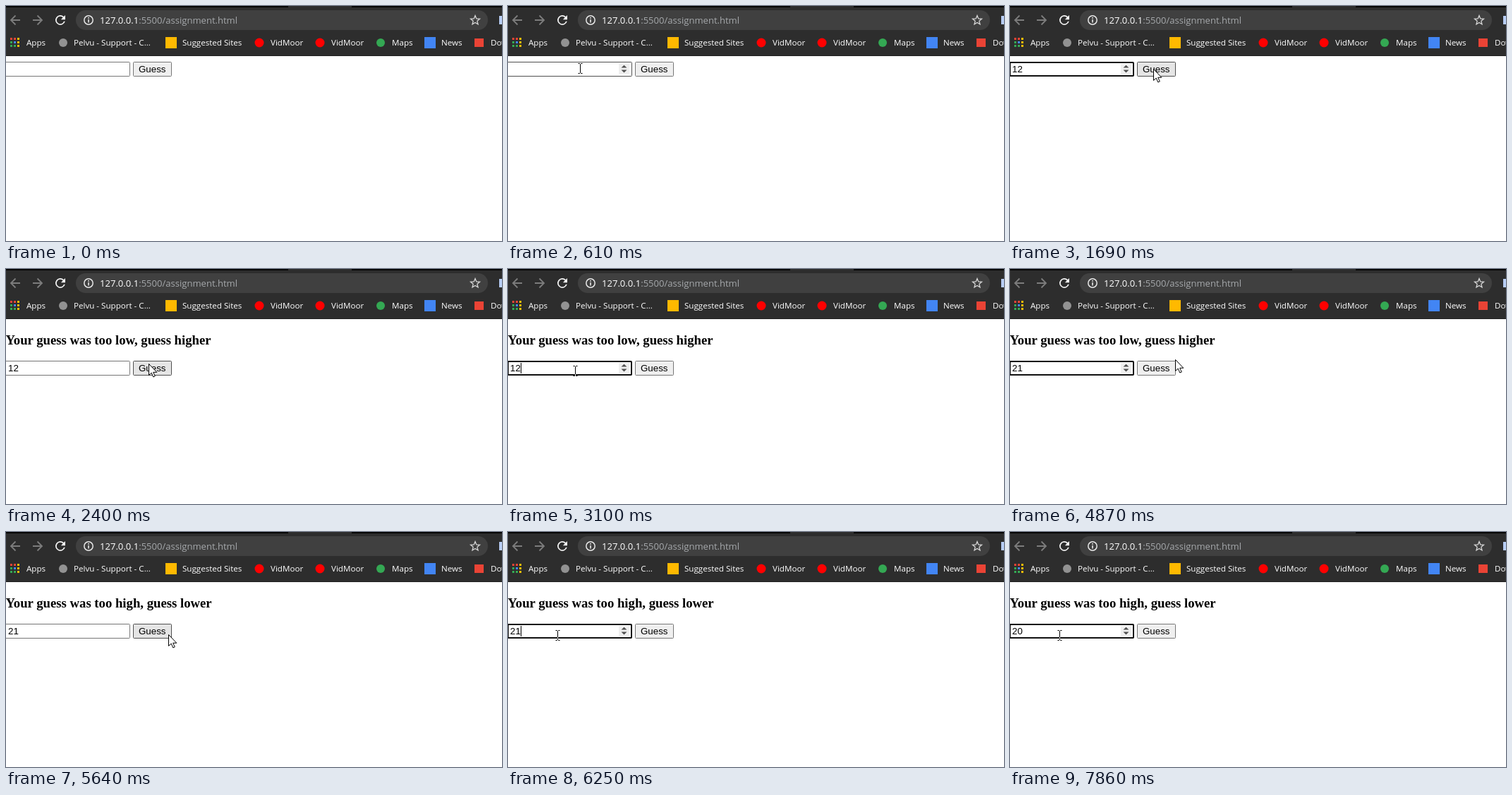
Write an HTML page that moves like this. It is 703 px wide and 333 px high and loops after 8 s.

```html
<!DOCTYPE html>
<html lang="en">
<head>
<meta charset="utf-8">
<title>Number guessing page</title>
<style>
  html, body { margin: 0; width: 100%; height: 100%; overflow: hidden; background: #fff; }
  svg { display: block; width: 100%; height: 100%; }
  text { white-space: pre; }
  .url { font: 13.05px "Open Sans", "Noto Sans", sans-serif; }
  .marks { font: 11.6px "Open Sans", "Noto Sans", sans-serif; fill: #fff; }
  .form { font: 13.333px "Liberation Sans", Arial, sans-serif; }
  .message { font: bold 18.72px "Liberation Serif", Times, serif; }
  .icon { fill: none; stroke-width: 1.8; }
  #beam { mix-blend-mode: difference; }
</style>
</head>
<body>
<svg viewBox="0 0 703 333">
  <rect width="703" height="333" fill="#fff"/>

  <!-- browser toolbar -->
  <rect width="703" height="71" fill="#2d2d2d"/>
  <path d="M0 0H400V2H0ZM490 0H703V2H490Z" fill="#050505"/>
  <rect y="70" width="703" height="1" fill="#202020"/>
  <rect x="99" y="6" width="584" height="28" rx="14" fill="#404040"/>
  <g class="icon">
    <path d="M20 20H7M13.5 13.5L7 20L13.5 26.5M38 20H51M44.500 13.5L51 20L44.500 26.5" stroke="#7c7c7c"/>
    <circle cx="117" cy="20" r="6.200" stroke="#e8e8e8" stroke-width="1.500"/>
    <path d="M117 19V23.500M117 16V17.700" stroke="#e8e8e8" stroke-width="1.600"/>
    <path id="star" stroke="#d6d6d6" stroke-width="1.300"/>
  </g>
  <path transform="translate(66.5 9.5) scale(.875)" fill="#f1f1f1"
    d="M17.650 6.350A8 8 0 1 0 19.730 14H17.650A6 6 0 1 1 16.220 7.780L13 11H20V4Z"/>
  <text class="url" x="133" y="25" fill="#fff">127.0.0.1<tspan fill="#a5a8ab">:5500/assignment.html</tspan></text>
  <rect x="699" y="14" width="12" height="12" fill="#b7cdf5"/>

  <g id="apps"></g>
  <circle cx="81" cy="52" r="6" fill="#929292"/>
  <rect x="226" y="44" width="16" height="16" fill="#ffb900"/>
  <circle cx="359" cy="52" r="6.5" fill="#f00"/>
  <circle cx="445" cy="52" r="6.5" fill="#f00"/>
  <circle cx="531" cy="52" r="6" fill="#34a853"/>
  <rect x="593" y="44" width="16" height="16" fill="#4285f4"/>
  <rect x="664" y="46" width="13" height="12" fill="#ea4335"/>
  <g class="marks" id="marks"></g>

  <!-- page -->
  <text class="message" id="message" x="-.6" y="107"></text>
  <g class="form" id="form">
    <rect id="field" x="-2.5" y=".5" width="178" height="20" rx="1" fill="#fff"/>
    <rect id="ring" x="0" y="1" width="175" height="19" rx="1.5" fill="none" stroke="#101010" stroke-width="2"/>
    <g id="spinner">
      <rect x="157" y="3" width="15" height="15" fill="#efefef"/>
      <path d="M160.500 8.600L164.500 4.700L168.500 8.600ZM160.500 11.500H168.500L164.500 15.400Z" fill="#505050"/>
    </g>
    <text id="value" x="3" y="15"></text>
    <rect id="caret" y="3" width="1" height="15"/>
    <rect id="button" x="180.5" y=".5" width="54" height="20" rx="1"/>
    <text x="188" y="15">Guess</text>
  </g>

  <path id="arrow" d="M0 0V16L3.700 12.600L6.300 18.500L8.800 17.400L6.200 11.800H11.300Z" fill="#fff" stroke="#000"/>
  <path id="beam" d="M-3 -7H-1L0 -6L1 -7H3M0 -6V6M-3 7H-1L0 6L1 7H3" fill="none" stroke="#fff"/>
</svg>

<script>
const LOOP = 8000, TICKS_PER_SECOND = 13;
const $ = id => document.getElementById(id);
const set = (id, attrs) => {
  for (const name in attrs) $(id).setAttribute(name, attrs[name]);
};
const show = (id, visible) => set(id, { visibility: visible ? 'visible' : 'hidden' });

// All times below are in ticks.
const mouse = [
  [1, 486, 325], [3, 205, 246], [5, 202, 178], [6, 130, 105], [7, 102, 88],
  [15, 102, 88], [18, 160, 104], [20, 186, 104], [22, 204, 90], [28, 204, 90],
  [31, 203, 135], [35, 150, 157], [36, 150, 157], [38, 90, 157], [39, 95, 144],
  [59, 95, 144], [61, 190, 152], [63, 235, 129], [64, 235, 129], [66, 188, 163],
  [68, 231, 146], [74, 231, 146], [77, 112, 151], [79, 112, 151], [81, 70, 146],
  [105, 70, 146]
];
const values = [
  [0, ''], [12, '1'], [14, '12'], [50, '1'], [52, ''], [54, '2'], [55, '21'],
  [90, '2'], [92, ''], [94, '2'], [96, '20']
];
const messages = [
  [0, ''], [28, 'Your guess was too low, guess higher'],
  [72, 'Your guess was too high, guess lower']
];
const focusSpans = [[9, 27], [39, 71], [81, 105]];
const caretSpans = [[9, 20], [39, 46], [52, 60], [66, 71], [81, 87], [92, 102]];
const pressSpans = [[27, 28], [71, 72]];

const latest = (list, tick) => list.filter(([start]) => start <= tick).pop()[1];
const within = (spans, tick) => spans.some(([a, b]) => tick >= a && tick < b);

function mouseAt(tick) {
  const i = Math.max(1, mouse.findIndex(([start]) => start >= tick));
  const [t0, x0, y0] = mouse[i - 1], [t1, x1, y1] = mouse[i];
  const k = Math.max(0, (tick - t0) / (t1 - t0));
  return [Math.round(x0 + (x1 - x0) * k), Math.round(y0 + (y1 - y0) * k)];
}

function draw(time) {
  const tick = Math.floor((time % LOOP + 10) * TICKS_PER_SECOND / 1000);
  const [x, y] = mouseAt(tick);
  const message = latest(messages, tick), value = latest(values, tick);
  const top = message ? 130 : 79;
  const inRow = tick > 0 && y >= top && y < top + 21;
  const overField = inRow && x < 176;
  const overButton = inRow && x >= 180 && x < 235;
  const overMessage = message && y >= 91 && y < 112 && x < 291;
  const focused = within(focusSpans, tick), pressed = within(pressSpans, tick);

  $('message').textContent = message;
  $('value').textContent = value;
  set('form', { transform: `translate(0 ${top})` });
  set('field', { stroke: overField ? '#4f4f4f' : '#767676' });
  show('ring', focused);
  show('spinner', focused || overField);
  set('caret', { x: Math.round(3 + 7.415 * value.length) });
  show('caret', within(caretSpans, tick));
  set('button', {
    fill: pressed ? '#f5f5f5' : overButton ? '#e5e5e5' : '#efefef',
    stroke: pressed ? '#8d8d8d' : overButton ? '#4f4f4f' : '#767676'
  });

  const isBeam = overField || overMessage;
  set('arrow', { transform: `translate(${x - 0.5} ${y - 0.5})` });
  set('beam', { transform: `translate(${x + 0.5} ${y + 0.5})` });
  show('arrow', tick > 0 && !isBeam);
  show('beam', tick > 0 && isBeam);
}

const star = Array.from({ length: 10 }, (_, i) => {
  const radius = i % 2 ? 3 : 6.8, angle = i * Math.PI / 5;
  return `${665 + radius * Math.sin(angle)} ${20.4 - radius * Math.cos(angle)}`;
});
set('star', { d: `M${star.join('L')}Z` });

const [red, yellow, green, blue] = ['#ea4335', '#fbbc04', '#34a853', '#4285f4'];
$('apps').innerHTML = [red, red, yellow, green, blue, yellow, green, green, yellow]
  .map((fill, i) => `<rect x="${6 + i % 3 * 5}" y="${45 + Math.floor(i / 3) * 5}" width="3" height="3" fill="${fill}"/>`)
  .join('');

$('marks').innerHTML = [
  [29, 'Apps'], [96, 'Pelvu - Support - C...'], [250, 'Suggested Sites'], [375, 'VidMoor'],
  [461, 'VidMoor'], [547, 'Maps'], [617, 'News'], [687, 'Dovrel']
].map(([x, label]) => `<text x="${x}" y="56">${label}</text>`).join('');

const start = performance.now();
function frame() {
  draw(performance.now() - start);
  requestAnimationFrame(frame);
}
frame();
</script>
</body>
</html>
```
